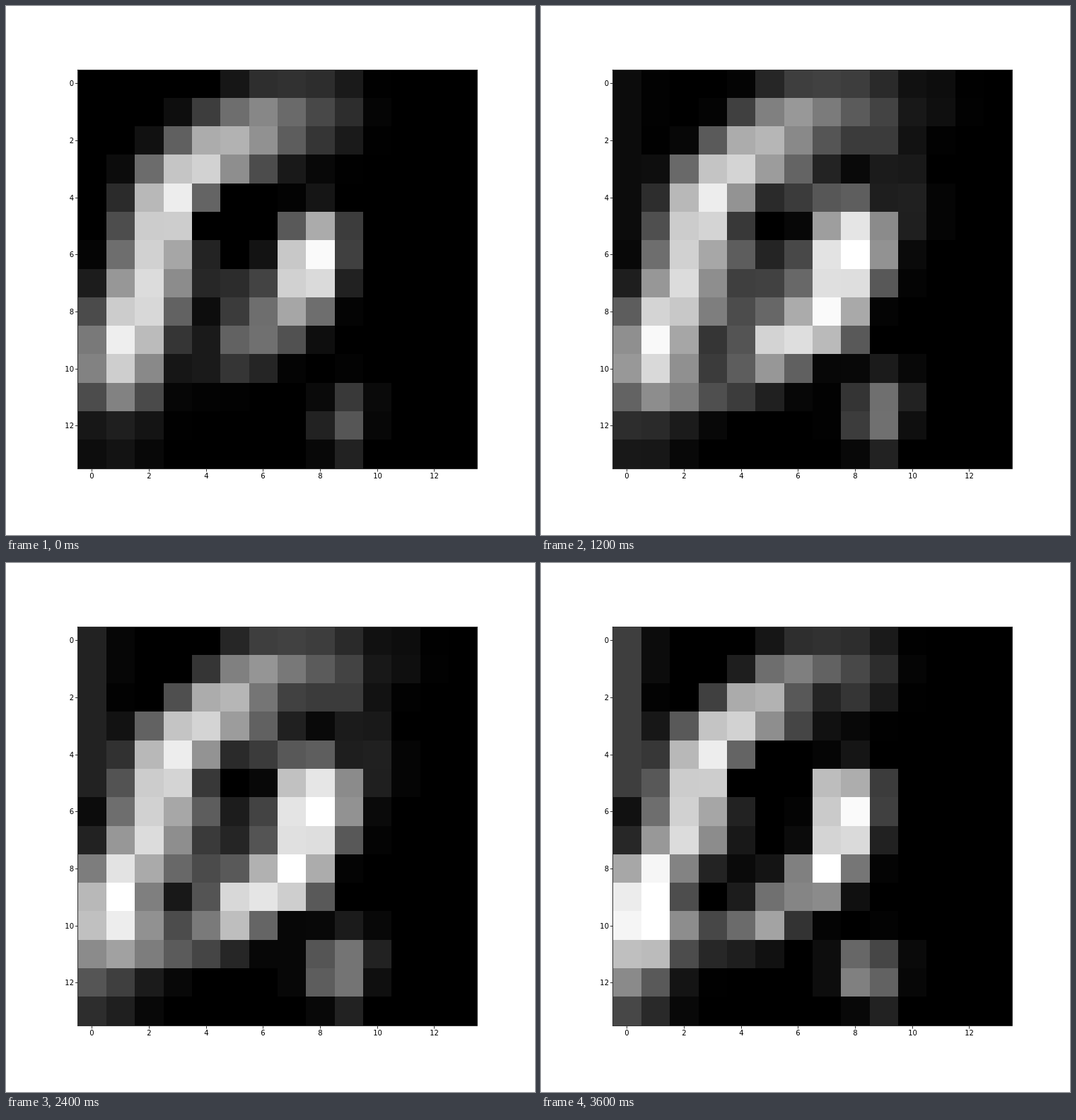
These frames come from a looping animation (748 by 748 pixels, 4 s). An HTML page with a canvas:

```html
<!DOCTYPE html>
<html lang="en">
<head>
<meta charset="utf-8">
<title>Heat map</title>
<style>
html, body { margin: 0; width: 100%; height: 100%; overflow: hidden; background: #fff; }
canvas { display: block; }
</style>
</head>
<body>
<canvas id="stage" width="748" height="748"></canvas>
<script>
const ctx = document.getElementById('stage').getContext('2d');
const N = 14, CELL = 40.33, LEFT = 101.7, TOP = 89.2;
const STEPS = 10, STEP_MS = 400;

const bump = r => r < 1 ? (1 + Math.cos(Math.PI * r)) / 2 : 0;

// A soft brush stroke through key points [x, y, own level]; returns its light at a cell.
function stroke(radius, level, ...points) {
  return (x, y) => {
    let best = 0;
    points.forEach(([ax, ay, a = level], i) => {
      const [bx, by, b = level] = points[i + 1] || points[i];
      const dx = bx - ax, dy = by - ay;
      const along = ((x - ax) * dx + (y - ay) * dy) / (dx * dx + dy * dy || 1);
      const s = Math.min(1, Math.max(0, along));
      const far = Math.hypot(x - ax - s * dx, y - ay - s * dy);
      const light = (a + (b - a) * s) * bump(far / radius);
      if (Math.abs(light) > Math.abs(best)) best = light;
    });
    return best;
  };
}

// The figure at rest.
const base = [
  stroke(2.4, 220, [8, 1, 72], [6, 1.5, 150], [4.2, 2.6, 205], [2.8, 4, 242],
    [2.2, 6, 212], [2, 7], [1.2, 9, 242], [1, 10, 206], [.8, 12, 30]),
  stroke(1.9, 250, [7.9, 5.5, 205], [7.65, 6.2, 280], [7.5, 7.1],
    [6.7, 8.2, 140], [5.3, 9.1, 105], [4.4, 9.5, 35]),
  stroke(1.4, 95, [9, 11.2, 60], [8.8, 12.2]),
  stroke(2, -140, [4.8, 4.7]),
  stroke(2, 45, [5, 6.8])
];
// Change that builds up over the loop.
const drift = [
  stroke(1.4, 62, [0, 0], [0, 5]),
  stroke(2, 115, [0, 8.6], [0, 12]),
  stroke(1.3, 110, [3, 10.4, 60], [5, 10]),
  stroke(1.4, 130, [8, 11.5]),
  stroke(1.5, 110, [6.8, 8.3]),
  stroke(1.1, 100, [7, 5]),
  stroke(1.8, -85, [5.3, 7.1]),
  stroke(1.5, -160, [2.4, 8.6]),
  stroke(1.4, -50, [2, 2.2], [3.5, .7]),
  stroke(1.4, -80, [6.5, 2])
];
// Change that comes and goes.
const swell = [
  stroke(1.9, 24, [5, .6], [10.5, .6]),
  stroke(1.5, 38, [9.2, 2.2], [10, 4.5]),
  stroke(1.3, 95, [4.6, 4], [6.2, 3.8], [8, 4.3], [9, 5.4], [9, 6.5]),
  stroke(1.3, 72, [4, 5.2], [4.3, 6.3], [6.2, 6.6], [6.4, 5]),
  stroke(1.5, 125, [7.6, 8.6], [5, 8.8], [3.6, 8.2, 75]),
  stroke(1.4, 80, [2.5, 11], [4, 10.5], [5.5, 10]),
  stroke(1.9, 60, [9, 11])
];

const sum = (layer, x, y) => layer.reduce((total, part) => total + part(x, y), 0);
const edge = (start, i) => Math.round(start + i * CELL);

const cells = Array.from({ length: N * N }, (_, i) => {
  const x = i % N, y = Math.floor(i / N);
  return { x, y, rest: sum(base, x, y), drift: sum(drift, x, y), swell: sum(swell, x, y) };
});

function drawAxes() {
  ctx.fillStyle = ctx.strokeStyle = '#000';
  ctx.lineWidth = .8;
  ctx.strokeRect(101.5, 90.5, 565, 564);
  ctx.font = '10px "DejaVu Sans", sans-serif';
  for (let i = 0; i < N; i += 2) {
    const x = Math.floor(LEFT + (i + .5) * CELL), y = Math.round(TOP + (i + .5) * CELL);
    ctx.fillRect(x + .1, 655, .8, 3.5);
    ctx.fillRect(98, y + .1, 3.5, .8);
    ctx.textAlign = 'center';
    ctx.fillText(i, x + .5, 668);
    ctx.textAlign = 'right';
    ctx.fillText(i, 96, y + 4);
  }
}

function draw() {
  const u = Math.floor(performance.now() / STEP_MS) % STEPS / (STEPS - 1);
  const rise = u ** 1.5, wave = Math.sin(Math.PI * u);
  ctx.fillStyle = '#fff';
  ctx.fillRect(0, 0, 748, 748);
  ctx.fillStyle = '#000';
  ctx.fillRect(102, 91, 564, 563);
  for (const c of cells) {
    const v = c.rest + rise * c.drift + wave * c.swell;
    const g = Math.round(Math.min(255, Math.max(0, v)));
    const x = edge(LEFT, c.x), y = Math.max(91, edge(TOP, c.y));
    ctx.fillStyle = `rgb(${g},${g},${g})`;
    ctx.fillRect(x, y, edge(LEFT, c.x + 1) - x, edge(TOP, c.y + 1) - y);
  }
  drawAxes();
  requestAnimationFrame(draw);
}
draw();
</script>
</body>
</html>
```
